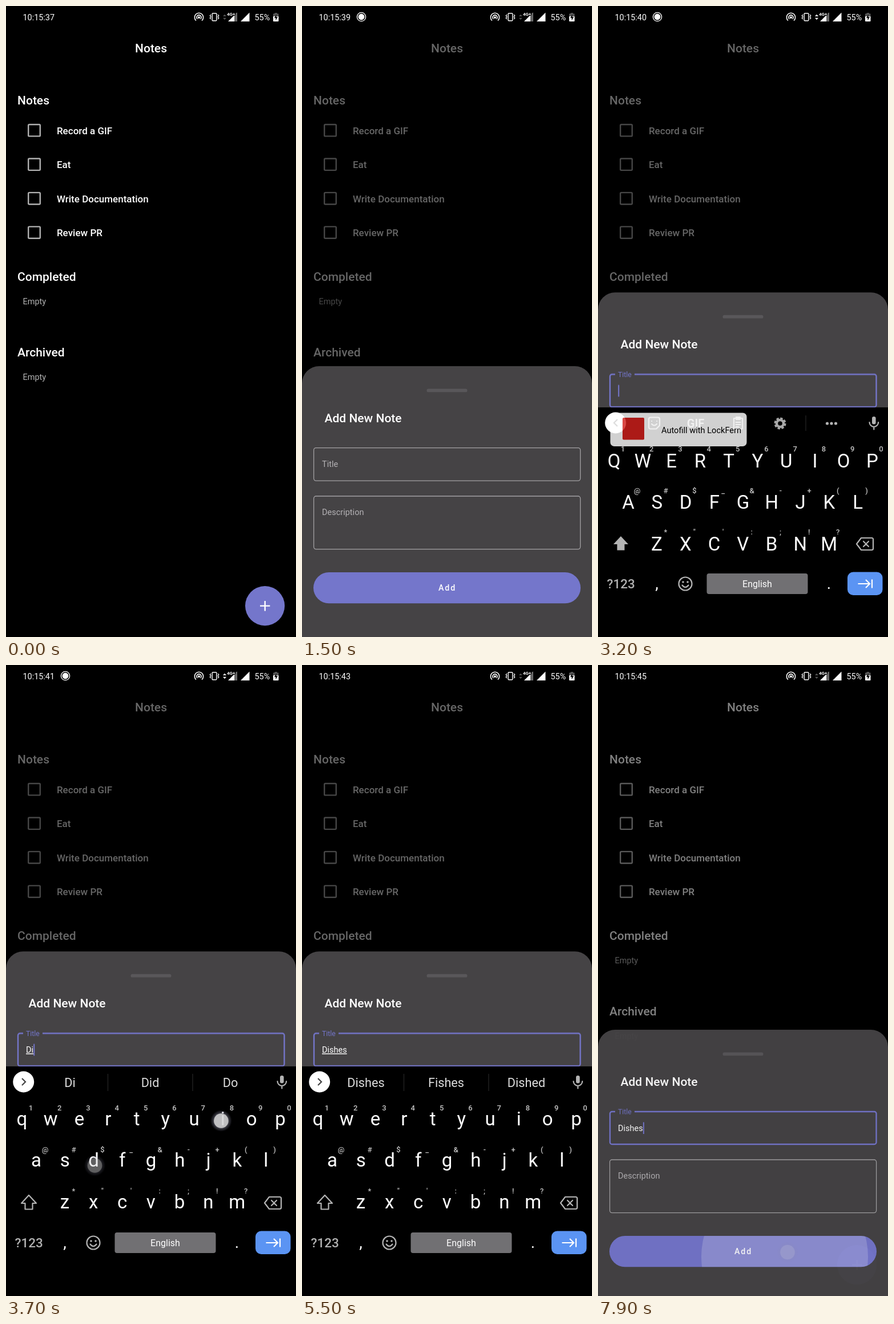
These frames come from a looping animation (508 by 1102 pixels, 8 s). An HTML page:

```html
<!DOCTYPE html>
<html lang="en">
<head>
<meta charset="utf-8">
<title>Notes</title>
<style>
  html, body { margin: 0; width: 100%; height: 100%; overflow: hidden; background: #000; }
  svg { display: block; width: 508px; height: 1102px; font-family: Roboto, sans-serif; }
  text { fill: #fff; white-space: pre; }
  .mid { text-anchor: middle; }
  .bold { font-weight: 500; }
  .line { fill: none; stroke: #b4b4b4; stroke-width: 2.2; stroke-linecap: round; stroke-linejoin: round; }
</style>
</head>
<body>
<svg id="stage" viewBox="0 0 508 1102"></svg>
<script>
const LOOP = 8000, LEAD = 30, PURPLE = '#7476cb';
const rules = [];

// Registers a keyframe track of [ms, declarations, easing] and returns its class attribute.
function track(stops, extra = '') {
  const name = 'k' + rules.length;
  const all = [[0, stops[0][1]], ...stops, [LOOP, stops[stops.length - 1][1]]];
  const frames = all.map(([ms, css, ease = 'linear']) =>
    `${(ms / LOOP * 100).toFixed(3)}%{${css};animation-timing-function:${ease}}`).join('');
  rules.push(`@keyframes ${name}{${frames}}.${name}{animation:${name} ${LOOP}ms infinite}`);
  return `class="${name} ${extra}"`;
}

// Hard on/off switching: on, off, on, off ...
function show(times, extra) {
  const stops = times.map((ms, i) => [Math.max(0, ms - LEAD), 'opacity:' + (i % 2 ? 0 : 1), 'step-end']);
  if (times[0] > 0) stops.unshift([0, 'opacity:0', 'step-end']);
  return track(stops, extra);
}

const text = (x, y, size, str, attrs = '') =>
  `<text x="${x}" y="${y}" font-size="${size}" ${attrs}>${str.replace(/&/g, '&amp;')}</text>`;
const rect = (x, y, w, h, r, attrs) =>
  `<rect x="${x}" y="${y}" width="${w}" height="${h}" rx="${r}" ${attrs}/>`;
const path = (d, attrs = 'class="line"') => `<path d="${d}" ${attrs}/>`;
const circle = (x, y, r, attrs) => `<circle cx="${x}" cy="${y}" r="${r}" ${attrs}/>`;
const MID = 'class="mid"', BOLD = 'class="bold"';

function tap(x, y, on, off) {
  const attrs = track([[on - LEAD - 1, 'opacity:0', 'step-end'], [on - LEAD, 'opacity:1'],
    [off, 'opacity:1'], [off + 400, 'opacity:0']]);
  return `<g ${attrs}>${circle(x, y, 19, 'fill="url(#halo)"')}${circle(x, y, 12.8, 'fill="#ddd" fill-opacity=".8"')}</g>`;
}

function ripple(x, y, r, from, to, end, clip) {
  const grow = track([[from, `transform:translate(${x}px,${y}px) scale(.1);opacity:0`],
    [from + 40, `transform:translate(${x}px,${y}px) scale(.3);opacity:.22`],
    [to, `transform:translate(${x}px,${y}px) scale(1);opacity:.22`],
    [end, `transform:translate(${x}px,${y}px) scale(1);opacity:0`]]);
  return `<g clip-path="url(#${clip})">${circle(0, 0, r, `fill="#fff" ${grow}`)}</g>`;
}

function statusBar() {
  const clock = Array.from({ length: 9 }, (_, i) => {
    const from = i ? i * 1000 - 500 : 0;
    return text(29.5, 24.6, 14.4, '10:15:' + (37 + i), show(i < 8 ? [from, i * 1000 + 500] : [from]));
  }).join('');
  const arrows = 'M380 18l3-3.3 3 3.3zM380 20.7l3 3.3 3-3.3z';
  const white = 'fill="none" stroke="#fff" stroke-width="1.6"';
  return clock +
    `<g ${show([300, 5000])}>${circle(104, 19, 7.6, 'fill="none" stroke="#fff" stroke-width="1.4"')}${circle(104, 19, 5.4, 'fill="#fff"')}</g>` +
    path('M333 25.5a7.6 7.6 0 1 1 10 0M335.2 22.7a4 4 0 1 1 5.6 0', white) + circle(338, 20, 2, 'fill="#fff"') +
    rect(361.2, 12.8, 7.6, 13, 1, 'fill="none" stroke="#fff" stroke-width="1.4"') +
    path('M359 15l-1.8 2 1.8 2-1.8 2 1.8 2M371 15l1.8 2-1.8 2 1.8 2-1.8 2', 'fill="none" stroke="#fff" stroke-width="1.2"') +
    path(arrows, 'fill="#555"') + path(arrows, 'fill="#fff" ' + show([2800, 5500, 6800, 7500])) +
    path('M404.5 11.5v15.5h-15.5z', 'fill="#fff"') + path('M404.5 11.5v15.5h-4.5v-11z', 'fill="#666"') +
    text(387, 17, 8, '4G+', 'font-weight="700" stroke="#000" stroke-width="2" paint-order="stroke"') +
    path('M426.5 11.5v15.5h-15.5z', 'fill="#fff"') + text(435.5, 24.6, 14.4, '55%') +
    path('M470.5 12h4.5v1.5h2.5v6h-9.500v-6h2.5z', 'fill="#555"') + rect(468, 18, 9.5, 9, 1, 'fill="#fff"') +
    path('M473.500 14.500l-3.500 6.500h2.500v4.500l3.500-6.500h-2.500z', 'fill="#000"');
}

function notes() {
  const items = ['Record a GIF', 'Eat', 'Write Documentation', 'Review PR'].map((label, i) => {
    const y = 217 + i * 59.45;
    return rect(39.2, y - 10, 20.6, 20.4, 1.5, 'fill="none" stroke="#b0b0b0" stroke-width="2.4"') +
      text(89, y + 7, 17, label, BOLD);
  }).join('');
  const heads = [['Notes', 171.5], ['Completed', 479.5], ['Archived', 611.7]]
    .map(([s, y]) => text(20, y, 21, s, BOLD)).join('');
  return text(254, 80.5, 21, 'Notes', 'class="mid bold"') + heads + items +
    [521, 653].map(y => text(29.5, y, 14.5, 'Empty', 'style="fill:#b3b3b3"')).join('') +
    circle(453.6, 1047.6, 34.6, `fill="${PURPLE}"`) +
    ripple(453.6, 1047.6, 36, 450, 700, 950, 'fabClip') +
    path('M445 1047.600h17.400M453.700 1039v17.400', 'stroke="#fff" stroke-width="2.4"') +
    tap(455, 1050, 400, 600);
}

// Each typed state: time, text, caret offset.
const typed = [[2300, '', 0], [3400, 'D', 9.6], [3600, 'Di', 13], [3900, 'Dis', 20.5],
  [4100, 'Dish', 28.500], [4400, 'Dishe', 36.2], [4700, 'Dishes', 43.7]];
const blinks = { 0: [2300, 2800, 3200, 3400], 6: [4700, 5100, 5600, 6100, 6600, 7100, 7600] };

function titleField() {
  const states = typed.map(([ms, str, w], i) => {
    const next = i < 6 ? typed[i + 1][0] : 6500;
    return text(35, 177, 14.5, str, 'text-decoration="underline" ' + show([ms, next])) +
      rect(35 + w + .2, 161.500, 2, 20.5, 0, `fill="${PURPLE}" ` + show(blinks[i] || [ms, next]));
  }).join('');
  const label = track([
    [1880, 'transform:translate(35px,176px);fill:#b4b2b5', 'ease-out'],
    [2030, `transform:translate(35px,147.500px) scale(.85);fill:${PURPLE}`]]);
  return rect(20.6, 142.6, 467, 57.500, 4, 'fill="none" stroke="#a3a1a4" stroke-width="1.3" ' + show([0, 1900])) +
    path('M64 143H484a3.500 3.500 0 0 1 3.500 3.500V196.500a3.500 3.500 0 0 1-3.500 3.500H24.500a3.500 3.500 0 0 1-3.500-3.500V146.500a3.500 3.500 0 0 1 3.500-3.500H30',
      `fill="none" stroke="${PURPLE}" stroke-width="2.4" ` + show([1900])) +
    text(0, 0, 14.5, 'Title', label) + states + text(35, 177, 14.5, 'Dishes', show([6500]));
}

function sheet() {
  const open = track([
    [950, 'transform:translateY(473px);opacity:.4', 'cubic-bezier(.2,.6,.4,1)'],
    [1200, 'transform:translateY(0);opacity:1'], [7820, 'transform:translateY(0);opacity:1', 'ease-in'],
    [7910, 'transform:translateY(9.5px);opacity:.95'], [8000, 'transform:translateY(45px);opacity:.8']]);
  const lift = track([
    [2150, 'transform:translateY(629px)', 'ease-in-out'], [2480, 'transform:translateY(500.3px)'],
    [7280, 'transform:translateY(500.3px)', 'ease-in-out'], [7560, 'transform:translateY(629px)']]);
  return `<g ${open}><g ${lift}>` +
    path('M0 660V30A30 30 0 0 1 30 0H478A30 30 0 0 1 508 30V660z', 'fill="#454345"') +
    rect(218.500, 39.500, 71, 5.800, 2.900, 'fill="#59575a"') + text(39.500, 97.6, 21, 'Add New Note', BOLD) +
    titleField() +
    rect(20.6, 227, 467, 92.6, 4, 'fill="none" stroke="#a3a1a4" stroke-width="1.3"') +
    text(35, 260, 14.5, 'Description', 'style="fill:#b4b2b5"') +
    rect(20, 360, 468, 54.3, 27.1, `fill="${PURPLE}"`) + ripple(327, 397, 146, 7600, 7890, 8000, 'addClip') +
    text(239, 392.3, 14.2, 'Add', 'class="bold" letter-spacing="1.9"') + tap(332, 388.500, 7600, 8000) +
    tap(252, 173, 1700, 1850) + '</g></g>';
}

const rows = [
  { keys: 'qwertyuiop', hints: '1234567890', x: 28, y: 804, hintY: 778 },
  { keys: 'asdfghjkl', hints: '@#$_&-+()', x: 53, y: 876, hintY: 851 },
  { keys: 'zxcvbnm', hints: '*"\':;!?', x: 103, y: 948.5, hintY: 923 }];

function letters(upper) {
  return rows.map(r => [...r.keys].map((k, i) =>
    text(r.x + i * 50.27, r.y + (upper ? 2 : 0), 33, upper ? k.toUpperCase() : k, MID)).join('')).join('');
}

const hints = () => rows.map(r => [...r.hints].map((h, i) =>
  text(r.x + 15.5 + i * 50.27, r.hintY, 13, h, 'class="mid bold" style="fill:#c4c4c4"')).join('')).join('');

function pressKey(label, dx, dy, on, off) {
  const k = label.toLowerCase(), r = rows.find(row => row.keys.includes(k));
  const x = r.x + r.keys.indexOf(k) * 50.27, y = r.y;
  return `<g ${show([on, off])}>${rect(x - 25.500, y - 127, 51, 144.500, 6, 'fill="#38454b"')}` +
    text(x, y - 82, 34, label, MID) + text(x + 14, y - 67, 15, '...', 'class="mid bold"') + '</g>' +
    tap(x + dx, y + dy, on, off + 100);
}

function toolbar() {
  const icons =
    path('M92 718.500h13a3 3 0 0 1 3 3v11l-6 6h-10a3 3 0 0 1-3-3v-14a3 3 0 0 1 3-3zM94 725h.1M103 725h.1M94 730q4.500 5 9 0') +
    text(171, 736, 20, 'GIF', 'class="mid" font-weight="700" style="fill:#b4b4b4"') +
    path('M238 720h15v18.500h-15zM242 718h7v4h-7zM241.500 727h8M241.500 731h8M241.500 735h5') +
    circle(319, 729, 6, 'fill="none" stroke="#a8a8a8" stroke-width="4.5"') +
    circle(319, 729, 9, 'fill="none" stroke="#a8a8a8" stroke-width="3" stroke-dasharray="4.4 2.670"') +
    path('M364 715v27', 'stroke="#222" stroke-width="1.3"') +
    [401.500, 409, 416.500].map(x => circle(x, 729, 2.6, 'fill="#b4b4b4"')).join('');
  const words = [[3400, 'D', 'Do', 'Did'], [3600, 'Di', 'Did', 'Do'], [3900, 'Dis', 'Did', 'Dish'],
    [4100, 'Dish', 'Fish', 'Dishes'], [4400, 'Dishe', 'Dished', 'Dishes'], [4700, 'Dishes', 'Fishes', 'Dished'], [6500]];
  const suggestions = words.slice(0, -1).map(([ms, ...list], i) => `<g ${show([ms, words[i + 1][0]])}>` +
    list.map((w, j) => text(112 + j * 140.500, 737, 21.7, w, 'class="mid" style="fill:#dcdcdc"')).join('') + '</g>').join('');
  const chevron = (d, when) => path(d, 'fill="none" stroke="#444" stroke-width="2.2" ' + show(when));
  return `<g ${show([0, 3400])}>${icons}</g>` + suggestions +
    path('M178.500 714v30M327 714v30', 'stroke="#242424" stroke-width="1.3" ' + show([3400, 6500])) +
    circle(30.700, 728, 18.500, 'fill="#fff"') +
    chevron('M34 722l-6 6 6 6', [0, 3400]) + chevron('M28 722l6 6-6 6', [3400]) +
    rect(480, 717, 6.6, 13.500, 3.300, 'fill="#b4b4b4"') + path('M475.500 727a7.800 7.800 0 0 0 15.600 0M483.300 735v4.500');
}

function autofill() {
  const fade = track([[2980, 'opacity:0'], [3200, 'opacity:.82'], [3260, 'opacity:1'], [3370, 'opacity:1'], [3520, 'opacity:0']]);
  return `<g ${fade}>${rect(21.500, 710.500, 239, 58.500, 7, 'fill="#fff"')}${rect(43, 719, 38, 38.500, 2, 'fill="#d2201d"')}` +
    text(111, 745.500, 14.6, 'Autofill with LockFern', 'style="fill:#000"') + '</g>';
}

function keyboard() {
  const slide = track([
    [1900, 'transform:translateY(430px)', 'ease-out'], [2250, 'transform:translateY(0)'],
    [7240, 'transform:translateY(0)', 'ease-in'], [7500, 'transform:translateY(430px)']]);
  const shift = 'M40 926l13 14h-6.500v10.500h-13v-10.500h-6.500z';
  const grey = 'style="fill:#b8b8b8"';
  return `<g ${slide}>${rect(0, 701, 508, 402, 0, 'fill="#000"')}` + toolbar() +
    `<g ${show([0, 3400])}>${letters(true)}${path(shift, 'fill="#b4b4b4"')}</g>` +
    `<g ${show([3400])}>${letters(false)}${path(shift)}</g>` + hints() +
    path('M461 929h18.500a2.500 2.500 0 0 1 2.500 2.500v16a2.500 2.500 0 0 1-2.500 2.500h-18.500l-8-10.500zM465 935l9 9M474 935l-9 9') +
    text(15.500, 1017, 22.500, '?123', 'class="bold" style="fill:#b0b0b0"') +
    text(103, 1018, 28, ',', MID) + text(404.500, 1018, 28, '.', MID) +
    circle(153, 1009, 11.500, 'class="line"') + path('M147.500 1011.500q5.500 7 11 0') +
    [149, 157].map(x => circle(x, 1006, 1.8, 'fill="#b4b4b4"')).join('') +
    rect(190.500, 991, 177, 36, 4, 'fill="#717073"') + text(279, 1014.700, 16, 'English', MID) +
    rect(437, 988.500, 61.500, 40.500, 10, 'fill="#5b94f3"') +
    path('M455.500 1009h20M469 1002l7 7-7 7M480 1001.500v15', 'fill="none" stroke="#fff" stroke-width="2.2"') +
    circle(424, 1236, 153, 'fill="#1a1a1d" ' + show([7200, 7300])) +
    autofill() +
    pressKey('D', 2, -2, 3300, 3400) + pressKey('i', -3, -8, 3500, 3600) + pressKey('s', -5, -21, 3800, 3900) +
    pressKey('h', 21, 4, 4000, 4100) + pressKey('e', 16.500, -17, 4300, 4400) + pressKey('s', -4, -12, 4600, 4700) +
    tap(450, 1012, 5600, 5700) + '</g>' + tap(448, 1013, 7000, 7160);
}

const dim = track([[950, 'opacity:0'], [1200, 'opacity:.6'], [7820, 'opacity:.6'], [7900, 'opacity:.5'], [8000, 'opacity:.35']]);
const art = `<defs>
  <radialGradient id="halo"><stop offset=".62" stop-color="#99a" stop-opacity=".5"/><stop offset="1" stop-color="#88a" stop-opacity="0"/></radialGradient>
  <clipPath id="fabClip">${circle(453.6, 1047.6, 34.6, '')}</clipPath>
  <clipPath id="addClip">${rect(20, 360, 468, 54.3, 27.1, '')}</clipPath></defs>` +
  notes() + rect(0, 0, 508, 1102, 0, 'fill="#000" ' + dim) + sheet() + keyboard() + statusBar();

const style = document.createElement('style');
style.textContent = rules.join('\n');
document.head.append(style);
document.getElementById('stage').innerHTML = art;
</script>
</body>
</html>
```
